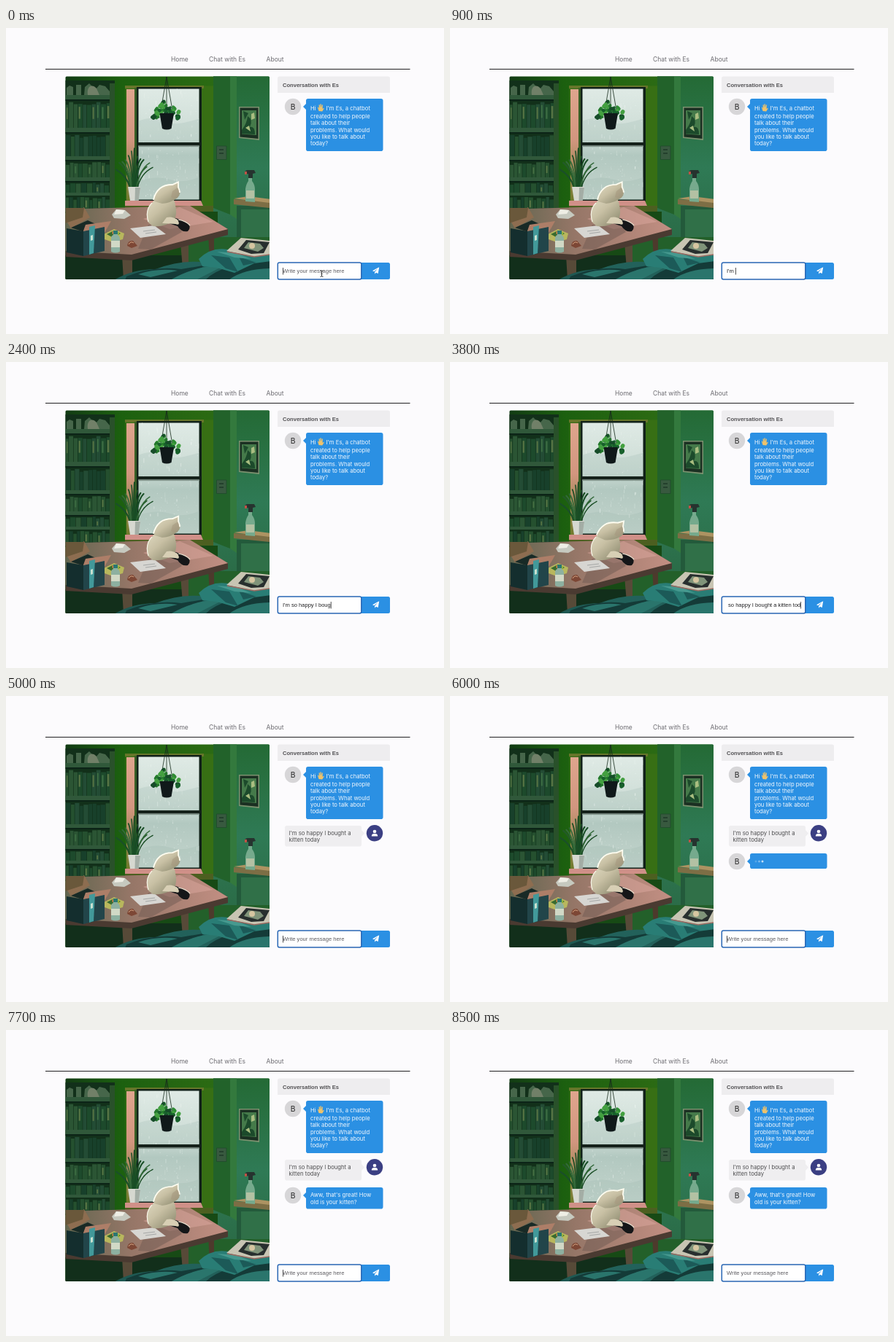
Write an HTML page that moves like this. It is 600x420 px and loops after 8600 ms.

```html
<!DOCTYPE html>
<html lang="en">
<head>
<meta charset="utf-8">
<title>Chat with Es</title>
<style>
  html, body { margin: 0; width: 100%; height: 100%; overflow: hidden; background: #fcfbfd; }
  svg { display: block; width: 600px; height: 420px; }
  text { font-family: Inter, "Liberation Sans", sans-serif; font-size: 7.7px; white-space: pre; }
  .nav { font-size: 8.5px; fill: #6c6b70; }
  .form { font-family: "Liberation Sans", sans-serif; font-size: 7.57px; }
  .white { fill: #f3f8fd; }
  .dark { fill: #505052; }
</style>
</head>
<body>
<svg viewBox="0 0 600 420">
  <defs>
    <clipPath id="photo"><rect x="81.5" y="66.5" width="279.5" height="278.5" rx="1.5"/></clipPath>
    <clipPath id="glass"><path d="M181 83H265V157H181ZM181 163H265V235H181Z"/></clipPath>
    <clipPath id="field"><rect x="379" y="324" width="102.500" height="19"/></clipPath>
    <linearGradient id="wall"><stop stop-color="#123b14"/><stop offset=".27" stop-color="#1c600f"/><stop offset=".7" stop-color="#2b6a13"/><stop offset="1" stop-color="#26692c"/></linearGradient>
    <linearGradient id="side" x2="0" y2="1"><stop stop-color="#246a35"/><stop offset=".45" stop-color="#2f7a55"/><stop offset="1" stop-color="#28633f"/></linearGradient>
    <linearGradient id="trim" x2="0" y2="1"><stop stop-color="#dfa58d"/><stop offset=".45" stop-color="#d2967f"/><stop offset="1" stop-color="#6f7a2c"/></linearGradient>
    <linearGradient id="sky" x2="0" y2="1"><stop stop-color="#dfeae5"/><stop offset=".45" stop-color="#cbdbd4"/><stop offset=".6" stop-color="#b2c8c0"/><stop offset="1" stop-color="#c3d4cc"/></linearGradient>
    <linearGradient id="desk" x2="1"><stop stop-color="#62664f"/><stop offset=".4" stop-color="#957667"/><stop offset="1" stop-color="#c38f83"/></linearGradient>
    <linearGradient id="fur" x2=".8" y2="1"><stop stop-color="#e3dec6"/><stop offset=".5" stop-color="#c8c0a4"/><stop offset="1" stop-color="#908d72"/></linearGradient>
    <linearGradient id="bed" x2="1" y2=".4"><stop stop-color="#153c38"/><stop offset=".5" stop-color="#22625b"/><stop offset="1" stop-color="#225f59"/></linearGradient>
    <g id="bot">
      <circle r="11.2" fill="#d7d6d8"/>
      <text y="3.6" text-anchor="middle" style="font-size:10.2px" fill="#252525">B</text>
      <path d="M14 0l4.5-4.5v9z" fill="#2b90e3"/>
    </g>
  </defs>

  <text class="nav" x="226" y="46.3">Home</text>
  <text class="nav" x="278" y="46.3">Chat with Es</text>
  <text class="nav" x="356.6" y="46.3">About</text>
  <path d="M54 56.5H553.5" stroke="#222123" stroke-width="1"/>

  <g clip-path="url(#photo)">
    <rect x="81" y="66" width="281" height="280" fill="url(#wall)"/>
    <path d="M284 66H362V346H284Z" fill="url(#side)"/>
    <path d="M284 66h23v190l-23-9z" fill="#22622a"/>
    <path d="M307 66H316V262L307 256Z" fill="#33793d"/>

    <!-- bookcase -->
    <path d="M81 72H149V254H81Z" fill="#12301a"/>
    <g id="books"></g>
    <path d="M81 92H148V98H81ZM81 137H148V143H81ZM81 176H148V181H81ZM81 205H148V210H81ZM81 226H148V230H81Z" fill="#30583a"/>
    <path d="M142 76H149V252H142Z" fill="#29512a"/>
    <path d="M81 98H142V100H81ZM81 143H142V145H81ZM81 181H142V183H81ZM81 210H142V212H81Z" fill="#0c2417"/>
    <path d="M83 92v-10l4-3 5 2v11zM96 92v-14h7v14zM107 92l1-11 6-5 5 5v11zM123 92v-8l5-6 8 2 6 7v5z" fill="#46664a"/>
    <path d="M112 92c-2-12 6-16 12-9l4 9z" fill="#718068"/>

    <!-- window -->
    <path d="M163 79H284V258L164 243Z" fill="#326c14"/>
    <path d="M268 80H284V250L268 242Z" fill="#376f14"/>
    <path d="M163 79H271V83H163Z" fill="#66762a"/>
    <path d="M165 84H176V238H165Z" fill="url(#trim)"/>
    <path d="M176 82H180V240H176Z" fill="#385e25"/>
    <path d="M179 81H268V238H179Z" fill="#102018"/>
    <path d="M181.500 83.500H264.500V235.500H181.500Z" fill="url(#sky)"/>
    <g clip-path="url(#glass)">
      <path d="M181 128q18-8 34 0t50-4v40h-85zM181 210q26-8 44-2t41-4v38h-85z" fill="#91aea5" opacity=".2"/>
      <g id="rain" stroke="#f4faf6" stroke-linecap="round"></g>
    </g>
    <path d="M180 157H266V161.500H180Z" fill="#15211a"/>
    <path d="M181 161.500H265V163H181Z" fill="#82938a"/>
    <path d="M163 237H267L270 244H163Z" fill="#d09088"/>
    <path d="M163 244H284V261L163 248Z" fill="#4c5f20"/>

    <!-- hanging plant -->
    <path d="M220 67L211 119M220 67L229 119M220 67V118" stroke="#172b1c" stroke-width=".8" fill="none"/>
    <g id="hanging"></g>
    <path d="M210.500 117H230L226.500 138Q220 141 214 138Z" fill="#10191a"/>

    <!-- sill plant -->
    <g id="blades" fill="none" stroke-linecap="round"></g>
    <path d="M167 218H184L181.500 237H170Z" fill="#d6d8d0"/>
    <path d="M177 219h7l-2.500 18h-5z" fill="#a3ada5"/>

    <!-- right wall -->
    <path d="M288.500 162H302V180.500H288.500Z" fill="#38593f" stroke="#204a2b" stroke-width=".8"/>
    <path d="M292 167h6M292 172h6" stroke="#1e3827" stroke-width="1.600"/>
    <path d="M319 108H347V154L319 151Z" fill="#7d9270"/>
    <path d="M320.500 109.500H345.500V152L320.500 149.500Z" fill="#1b3022"/>
    <path d="M323 113H343V147L323 145.500Z" fill="#457a4a"/>
    <path d="M323 140q7-9 8-19 8 5 3 15 7-2 7 10l-18-1zM325 114l7 3-5 9z" fill="#1c4a2b"/>
    <path d="M336 118l4-2 1 8-5 2zM328 137l5-3 2 8z" fill="#a9bd80"/>
    <path d="M316 244H361V345H316Z" fill="#235a3b"/>
    <path d="M322 249H362V304L322 290Z" fill="#307048"/>
    <path d="M312 235L361 238V247L312 242Z" fill="#7d6e45"/>
    <path d="M312 234L332 231 362 235V240Z" fill="#ad9362"/>
    <path d="M328 238V221Q329 214 332 210V205H337V210Q341 215 341 222V239Z" fill="#76aa8d"/>
    <path d="M329 223h11v11h-11z" fill="#b3c1a3"/>
    <path d="M327 197l3-2h10l2 4-4 1v6h-6v-6l-5 1z" fill="#26332f"/>
    <path d="M327 197h3v4h-3z" fill="#bd5346"/>

    <!-- desk -->
    <path d="M81 252H290V346H81Z" fill="#174a15"/>
    <path d="M81 312H250V346H81Z" fill="#122f1b"/>
    <path d="M250 287L362 287V346H250Z" fill="#23602a"/>
    <path d="M239 294L250 290V330H242ZM159 312H173V346H161Z" fill="#574a38"/>
    <path d="M277 284l8-2v34h-6z" fill="#4d3a2c"/>
    <path d="M81 257L108 248 252 245 304 276V284L172 319 81 314Z" fill="#4a3a31"/>
    <path d="M81 256L108 248 252 244 304 276 172 311 81 306Z" fill="url(#desk)"/>
    <path d="M238 246L284 266 224 276 188 262Z" fill="#e0aaa2" opacity=".45"/>
    <path d="M195 270l39-2 7 12-43 24-17-1z" fill="#715a53" opacity=".5"/>
    <path d="M170 275L203 271 219 283 184 288Z" fill="#d7d6d2"/>
    <path d="M188 279l16-2M191 282l15-2" stroke="#a4a6a5"/>
    <path d="M145 256l6-7 12 1 8 7-9 5-14-1z" fill="#c6c9bf"/>
    <path d="M151 249l12 1-3 5-12 1z" fill="#eeeee5"/>
    <path d="M134 283l14-7 14 6-2 8-14 4-11-4z" fill="#b8b75d"/>
    <path d="M138 283l10-5 9 4-10 6z" fill="#396b2f"/>
    <circle cx="148" cy="281" r="2.500" fill="#e1854d"/><circle cx="153" cy="282" r="2" fill="#9bbb3c"/>
    <path d="M166 299q1-8 8-7l6 7-8 3z" fill="#7d4735"/>
    <path d="M168 297q3-5 7-2" stroke="#d8a884" fill="none"/>
    <path d="M144 307V289q0-4 3-5v-6h6v6q3 2 3 6v17q-6 3-12 0z" fill="#8db0a0"/>
    <path d="M144 292h12v9h-12z" fill="#d1d9c6"/><path d="M147 278h6v5h-6z" fill="#2c7772"/>

    <!-- box -->
    <path d="M81 262L107 246 115 260 89 275Z" fill="#8d6d50"/>
    <path d="M81 247h26l-2 13-24 8z" fill="#6a583b"/>
    <path d="M89 274L112 264 138 276 110 281Z" fill="#182a26"/>
    <path d="M109 270L144 265 134 283 104 284Z" fill="#ad7e68"/>
    <path d="M83 275L106 279V313L83 308Z" fill="#142e2e"/>
    <path d="M106 279L135 273V306L106 313Z" fill="#22454a"/>
    <path d="M114 273L122 271 120 309 114 311Z" fill="#42999a"/>
    <path d="M116 285l3-1v7l-3 1z" fill="#c8e1d1"/>

    <!-- cat -->
    <path d="M225 259Q236 261 248 268Q255 273 249 279Q241 281 235 272L220 267Z" fill="#151618"/>
    <path d="M236 263Q247 265 252 271" stroke="#e9e4d2" stroke-width="1.200" fill="none"/>
    <path d="M195 267Q190 250 200 240Q206 231 217 229Q231 231 232 243Q235 257 230 264Q217 274 201 272Z" fill="url(#fur)"/>
    <path d="M195 266Q190 250 200 240" stroke="#f5f3e4" stroke-width="1.300" fill="none"/>
    <path d="M220 260Q227 258 235 263 240 272 232 269L214 268Z" fill="#d8cfb5"/>
    <g id="head">
      <path d="M203 238Q203 228 211 220Q217 215 228 215L236 211.500 236 219Q241 227 235 233Q226 240 214 241Z" fill="url(#fur)"/>
      <path d="M202 236Q204 226 211 220Q217 215 228 215L236 211.500 236 219Q238 223 238 226" stroke="#fffdf0" stroke-width="1.800" fill="none"/>
      <path d="M228 224l7-5q4 6 0 13-6 3-9 0z" fill="#a6987e" opacity=".55"/>
    </g>

    <!-- bed -->
    <path d="M148 346Q173 331 205 331 236 319 267 321L362 292V346Z" fill="url(#bed)"/>
    <path d="M165 341q36-15 75-10l36-6-45 21h-68zM273 346q20-22 88-29v29z" fill="#143b38"/>
    <path d="M181 338q26-9 54-5l-37 9zM225 346q36-21 72-19l-37 19zM305 346q19-15 56-16v16z" fill="#2a756c"/>
    <path d="M264 317Q281 300 304 304L362 311V320L340 323 313 336 289 329 269 327Z" fill="#297d75"/>
    <path d="M281 312l25 3 12 20-17-5zM319 314l24 8-18 4z" fill="#1c5a58"/>
    <path d="M289 307l26 2 21 8-23-2z" fill="#46998f"/>
    <path d="M302 306L322 288 362 292V311L340 314Z" fill="#c8c5b3"/>
    <path d="M318 304L329 291 361 294 353 309 336 310Z" fill="#282f2e"/>
    <path d="M326 302l6-8 16 2 5 6-8 5z" fill="#80947a"/>
    <circle cx="337" cy="299" r="4" fill="#d6c6a1"/>
    <path d="M303 307l37 7 21-3" stroke="#9a6960" stroke-width="1.500" fill="none"/>
  </g>

  <path d="M372 89V69q0-2.500 2.500-2.500h149q2.500 0 2.500 2.500V89z" fill="#eeedef"/>
  <text class="form" x="379" y="80.500" font-weight="700" fill="#525154">Conversation with Es</text>

  <use href="#bot" x="393" y="108"/>
  <rect x="411" y="97" width="105.500" height="72" rx="2.800" fill="#2b90e3"/>
  <g class="white" id="greeting">
    <text x="417" y="112.800">Hi</text><text x="438.500" y="112.800">I'm Es, a chatbot</text>
  </g>
  <path d="M428.500 114l-1.500-5 1-.5 1 2-.5-5 1.200-.3.600 4 .2-5h1.200l.3 5 .8-4 1.200.3-.5 5.500 1.500-1.200.7.800-2.500 4z" fill="#efc36b"/>

  <g id="sent">
    <path d="M487 184l4 4.500-4 4.500z" fill="#efeef0"/>
    <rect x="382" y="178" width="105" height="28.500" rx="2.800" fill="#efeef0"/>
    <text class="dark" x="387.500" y="190.600">I'm so happy I bought a</text>
    <text class="dark" x="387.500" y="200.200">kitten today</text>
    <circle cx="505" cy="188.300" r="11.200" fill="#3b3f83"/>
    <circle cx="505" cy="186" r="2.300" fill="#fff"/>
    <path d="M500.800 192.600q0-3.600 3-3.600h2.400q3 0 3 3.600z" fill="#fff"/>
  </g>

  <g id="reply">
    <use href="#bot" x="393" y="227"/>
    <rect id="replyBox" x="411" y="216" width="105.500" height="29.500" rx="2.800" fill="#2b90e3"/>
    <g id="dots" fill="#fff"><circle cx="419" cy="227" r="1.500"/><circle cx="423.500" cy="227" r="1.500"/><circle cx="428" cy="227" r="1.500"/></g>
    <g id="answer" class="white"><text x="417" y="228.900">Aww, that's great! How</text><text x="417" y="238.500">old is your kitten?</text></g>
  </g>

  <path d="M487 322h36.500q2.500 0 2.500 2.500v18q0 2.500-2.500 2.500H487z" fill="#2b90e3"/>
  <path d="M502 333.200l9.200-5-1.500 8.800-3-1.200-1.600 1.900v-2.600l4.300-5-5.200 4.200z" fill="#fff"/>
  <rect x="372.300" y="322.100" width="114.500" height="22.800" rx="2.200" fill="#fff" stroke="#2866b4" stroke-width="1.500"/>
  <g clip-path="url(#field)">
    <text class="form" id="typed" y="336.300"></text>
    <rect id="caret" y="329" width=".8" height="9.500" fill="#242426"/>
  </g>
  <path id="pointer" d="M430.500 333q2 0 2 1.500v5.500q0 1.500-2 1.500M434.500 333q-2 0-2 1.500M434.500 341.500q-2 0-2-1.500M431.500 337.500h2" stroke="#171717" stroke-width=".8" fill="none"/>
</svg>

<script>
const LOOP = 8600, STEP = 100;
const SEND = 4400, LOADING = 5500, ANSWER = 6200;
const MESSAGE = "I'm so happy I bought a kitten today";
const TYPING = [[500, 0], [900, 4], [2400, 19], [3800, 34], [4000, 36]];
const BOW = [[0, 0], [3000, 0], [3400, 1], [4200, 1], [4700, 0], [7700, 0], [8100, 1], [8600, 1]];

const $ = id => document.getElementById(id);
const show = (node, on) => node.style.display = on ? "" : "none";

function add(parent, tag, attrs) {
  const node = document.createElementNS("http://www.w3.org/2000/svg", tag);
  for (const key in attrs) node.setAttribute(key, attrs[key]);
  return parent.appendChild(node);
}

function seeded(seed) {
  return () => (seed = (seed * 16807) % 2147483647) / 2147483647;
}
const random = seeded(4127);
const between = (a, b) => a + random() * (b - a);
const pick = list => list[Math.floor(random() * list.length)];

function track(steps, t) {
  if (t <= steps[0][0]) return steps[0][1];
  for (let i = 1; i < steps.length; i++) {
    const [t0, a] = steps[i - 1], [t1, b] = steps[i];
    if (t <= t1) return a + (b - a) * (t - t0) / (t1 - t0);
  }
  return steps.at(-1)[1];
}

function drawBooks() {
  for (const [top, bottom] of [[100, 137], [145, 176], [183, 205], [211, 226], [231, 252]]) {
    for (let x = 82; x < 140;) {
      const width = between(4, 8), y = top + between(1, 6);
      add($("books"), "rect", { x, y, width: width - .6, height: bottom - y,
        fill: pick(["#1d4a2c", "#25502f", "#18402b", "#2b5534", "#234c35"]) });
      if (random() > .7) add($("books"), "rect", { x: x + 1, y: y + 4, width: width / 3,
        height: (bottom - y) / 2, fill: pick(["#476f43", "#3a6a41", "#567343"]) });
      x += width;
    }
  }
}

function drawPlants() {
  for (let i = 0; i < 44; i++) {
    const a = random() * Math.PI * 2, r = Math.sqrt(random());
    const x = 220 + Math.cos(a) * r * 19, y = 109 + Math.sin(a) * r * 11 + Math.abs(Math.cos(a)) * r * 13;
    add($("hanging"), "ellipse", { cx: x, cy: y, rx: between(2.5, 4.5), ry: between(1.8, 3),
      transform: `rotate(${between(-60, 60)} ${x} ${y})`,
      fill: pick(["#17602b", "#23762c", "#2f8c34", "#164c29", "#43a040"]) });
  }
  for (let i = 0; i < 13; i++) {
    const u = i / 6 - 1, x = 176 + u * 25, y = 166 + Math.abs(u) * 26 + between(-3, 8);
    add($("blades"), "path", { d: `M${175 + u * 5} 219Q${175 + u * 10} ${y + 8} ${x} ${y}`,
      stroke: pick(["#174b22", "#235a28", "#33693a", "#1a4f28"]), "stroke-width": between(1.3, 2.3) });
  }
}

function makeRain() {
  return Array.from({ length: 130 }, (_, i) => {
    const moving = i < 45;
    return {
      x: between(182, 264), y: between(0, 154), speed: moving ? between(.02, .07) : 0,
      node: add($("rain"), "path", { d: `M0 0v${moving ? between(2, 6) : .2}`,
        "stroke-width": between(.5, 1.1), opacity: between(.2, .65) })
    };
  });
}

function drawInput(t) {
  const typing = t < SEND;
  const count = typing ? Math.floor(track(TYPING, t) + 1e-6) : 0;
  const field = $("typed");
  field.textContent = count ? MESSAGE.slice(0, count) : "Write your message here";
  field.setAttribute("fill", count ? "#222224" : "#5c5b60");
  const width = count ? field.getComputedTextLength() : 0;
  const end = Math.min(379 + width, 480.3);
  field.setAttribute("x", count ? end - width : 379);
  $("caret").setAttribute("x", end);
  show($("caret"), t < 4490 || (t - 4490) % 1060 < 530);
  show($("pointer"), t < 500);
}

function drawChat(t) {
  const answered = t >= ANSWER;
  show($("sent"), t >= SEND);
  show($("reply"), t >= LOADING);
  show($("answer"), answered);
  show($("dots"), !answered);
  $("replyBox").setAttribute("height", answered ? 29.5 : 21);
  [...$("dots").children].forEach((dot, i) =>
    dot.setAttribute("opacity", .6 + .4 * Math.cos((t - LOADING - i * 150) / 1000 * Math.PI * 2)));
}

function drawRoom(t) {
  for (const drop of rain) {
    const y = 82 + (drop.y + drop.speed * t) % 154;
    drop.node.setAttribute("transform", `translate(${drop.x} ${y})`);
  }
  const bow = track(BOW, t), ease = bow * bow * (3 - 2 * bow);
  const lick = Math.sin(t / 180) * .7;
  $("head").setAttribute("transform",
    `translate(${-1.5 * ease} ${4 * ease}) rotate(${8 * ease + lick} 218 237)`);
}

function render() {
  const t = Math.floor((performance.now() % LOOP) / STEP) * STEP;
  drawInput(t);
  drawChat(t);
  drawRoom(t);
  requestAnimationFrame(render);
}

["created to help people", "talk about their", "problems. What would", "you like to talk about", "today?"]
  .forEach((line, i) => add($("greeting"), "text", { x: 417, y: 123.6 + i * 9.45 }).textContent = line);
drawBooks();
drawPlants();
const rain = makeRain();
render();
</script>
</body>
</html>
```
